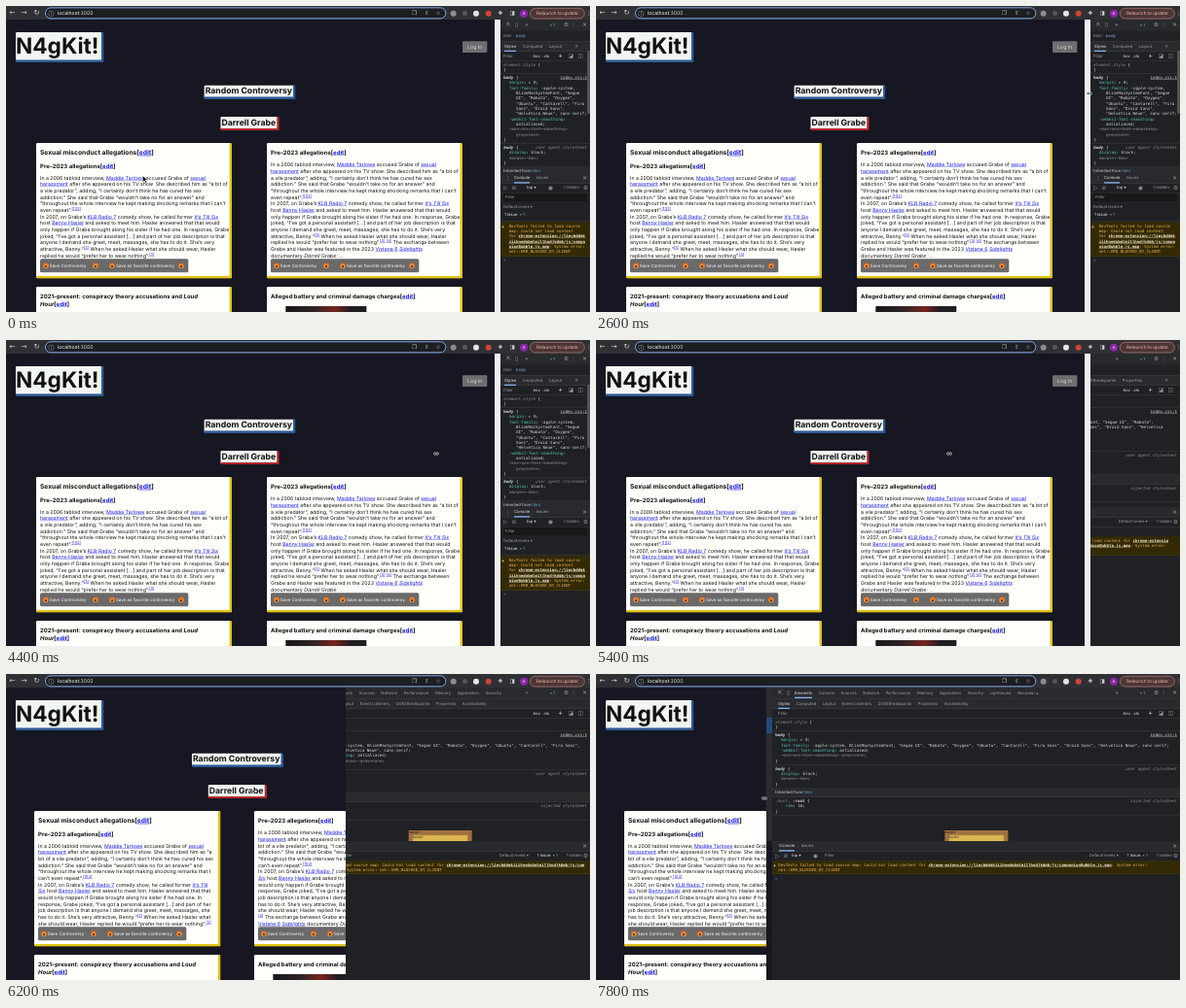
An HTML page for the animation above (8000 ms loop, 600 by 315 pixels).

```html
<!DOCTYPE html>
<html lang="en">
<head>
<meta charset="utf-8">
<title>Resizing developer tools</title>
<style>
html, body { margin: 0; width: 100%; height: 100%; overflow: hidden; background: #161722; }
#stage { position: absolute; width: 1800px; height: 945px; overflow: hidden; transform: scale(.333333); transform-origin: 0 0;
  font: 12.5px Inter, sans-serif; color: #9aa0a6; text-rendering: geometricPrecision; }
#stage > div, .b, .t { position: absolute; }
.t { line-height: 20px; white-space: nowrap; transform: translateY(-50%); }
.g { font-family: "DejaVu Sans", sans-serif; font-size: 17px; }
.on { color: #e8eaed; }

#page { left: 0; top: 42px; height: 903px; overflow: hidden; background: #161722; color: #111; }
#sheet { position: absolute; top: -42px; width: 1524px; height: 945px; }
.logo, .tag, .card { border: 0 solid; border-width: 0 8px 8px 0; border-radius: 4px; }
.logo { left: 30px; top: 81px; width: 264px; height: 85px; background: #f1f5f1; border-color: #2c5a94; font: 700 68px/85px Inter, sans-serif; }
.tag { left: 752px; height: 35px; padding: 0 3px; font: 700 26px/35px Inter, sans-serif; background: #f1f5f1; white-space: nowrap; transform: translateX(-50%); }
.login { left: 1407px; top: 109px; width: 76px; height: 35px; background: #6e6e70; border-radius: 3px; color: #ddd; font-size: 15.5px; line-height: 35px; text-align: center; }
.card { left: 93px; top: 423px; width: 595px; height: 411px; background: #fffffb; border-color: #e2c318; }
.second { left: 804px; }
.lower { top: 867px; }
.small .card { left: 87px; width: 567px; }
.small .second { left: 765px; }
.small .tag { left: 714px; }
.small .login { left: 1326px; }
.h { font: 700 18px/24px Inter, sans-serif; }
.big { font-size: 20px; }
.body { left: 12px; font-size: 15.65px; line-height: 20px; white-space: nowrap; }
a { color: #1818e4; text-decoration: underline; }
sup { font-size: 11.5px; line-height: 0; color: #1818e4; }
.narrowBreak, .small .wideBreak { display: none; }
.small .narrowBreak { display: inline; }
.bar { left: 12px; top: 358px; width: 457px; height: 42px; border-radius: 5px; background: #6a6a6a; color: #fff; font-size: 13.4px; }
.face { top: 12px; width: 18px; height: 18px; border-radius: 50%; background: radial-gradient(circle at 50% 65%, #5a2c16 14%, #ee9638 30%, #c9421f); }
.photo { left: 58px; top: 60px; width: 249px; height: 60px; background: linear-gradient(90deg, #17171b, #302326 35%, #78251d 60%, #211d22 80%); }
.scroll { left: 1506px; top: 0; width: 18px; height: 945px; background: #efefef; }

#dev { right: 0; top: 0; bottom: 0; background: #202124; }
.row { left: 0; right: 0; border-bottom: 1px solid #494c50; box-sizing: border-box; }
.head { background: #292a2d; }
.tree { left: -18px; top: 42px; width: 18px; height: 474px; background: linear-gradient(#2b2c30 93px, #244a7d 93px 141px, #2b2c30 141px); }
/* Tabs that do not fit wrap out of sight. */
.tabs { display: flex; flex-wrap: wrap; gap: 0 20px; height: 32px; line-height: 32px; overflow: hidden; white-space: nowrap; }
.tabs :first-child { color: #e8eaed; box-shadow: inset 0 -4px #8ab4f8; }
.main { left: 69px; right: 201px; top: 43px; }
.panes { left: 18px; right: 60px; top: 76px; }
.narrow .panes { left: 12px; }
.styles { left: 0; right: 0; top: 0; bottom: 0; }
.shift .styles { transform: translateY(33px); }
.code { font: 12.5px/16px "DejaVu Sans Mono", monospace; color: #d5d8dc; }
.rules { left: 0; right: 0; top: 136px; }
.rule { padding: 4px 9px 3px 10px; border-bottom: 1px solid #494c50; }
.rule div { padding-left: 38px; text-indent: -21px; }
.rule p { margin: 0; }
.rule em, .rule u { float: right; }
.rule em, .gray { color: #8b9096; }
.prop { color: #54c6bd; }
.rule s, .rule s .prop { color: #777c80; }
.inherit { height: 27px; padding-left: 10px; background: #292a2d; font: 12.5px/27px Inter, sans-serif; border-bottom: 1px solid #494c50; }
.model { left: 50%; width: 195px; height: 40px; margin-left: -97px; top: 483px; background: #a2703f; color: #222; font-size: 10px; line-height: 12px; }
.model i { position: absolute; inset: 14px 12px 0; background: #dfb753; border: 1px dashed #333; }
.thumb { right: 1px; top: 138px; width: 7px; height: 195px; border-radius: 4px; background: #5c5f63; }
.drawer { left: 0; right: 0; top: 516px; bottom: 0; background: #202124; }
.field { left: 9px; right: 9px; top: 62px; height: 25px; background: #17181a; }
.levels { display: flex; gap: 27px; right: 24px; top: 35px; line-height: 20px; white-space: nowrap; }
.issue { left: 12px; top: 66px; }
.narrow .issue { top: 122px; }
.log { left: 0; right: 0; top: 61px; }
.warn { padding: 4px 15px 4px 19px; background: #332a05; color: #eeb153; font-size: 12.2px; border-bottom: 1px solid #665500; }
.warn a { color: #f8ead0; font-weight: 700; word-break: break-all; }
.prompt { padding: 5px 9px; color: #5b9bf8; }
.shift .log { top: 91px; }
.narrow .log { top: 151px; }
.narrow .warn { padding-left: 26px; }
/* n: narrow, m: narrow or medium, w: medium or wide, x: wide only. */
.narrow .w, .shift .x, .wide .m, .wide .n, .shift:not(.narrow) .n { display: none; }
.badge { color: #8ab4f8; }

#chrome { left: 0; top: 0; width: 100%; height: 42px; background: #2f3034; color: #d5d6d9; }
#chrome .nav { font-size: 22px; }
.url { left: 120px; top: 4px; width: 1231px; height: 30px; border: 3px solid #7fa9ea; border-radius: 20px; background: #1d1e22; }
.address { font-size: 15.5px; }
.relaunch { left: 1614px; top: 6px; width: 166px; height: 30px; border-radius: 18px; border: 2px solid #bd8580; background: #4d3635; color: #f4b6b0; font-size: 14px; line-height: 30px; text-align: center; }
.dot { border-radius: 50%; }
#pointer svg { position: absolute; left: -14px; top: -14px; overflow: visible; }
</style>
</head>
<body>
<div id="stage">
  <div id="dev"></div>
  <div id="page"><div id="sheet"></div></div>
  <div id="chrome"></div>
  <div id="pointer">
    <svg width="28" height="28" stroke="#fff" stroke-width="1.5">
      <path id="arrow" d="M12 4v20l5-5 4 8 4-2-4-8h7z" fill="#111"/>
      <path id="resize" d="M5 14l6-5v3h6v-3l6 5-6 5v-3h-6v3z" fill="#222"/>
    </svg>
  </div>
</div>
<script>
const $ = id => document.getElementById(id);
// Layout helpers take stage pixels; the stage itself is laid out three times larger.
const px = n => (n * 3).toFixed(1) + 'px';
const text = (x, y, s, c = '') => `<span class="t ${c}" style="left:${px(x)};top:${px(y)}">${s}</span>`;
const textRight = (x, y, s, c = '') => `<span class="t ${c}" style="right:${px(x)};top:${px(y)}">${s}</span>`;
const box = (c, s = '', style = '') => `<div class="b ${c}" style="${style}">${s}</div>`;
const row = (y, h, c = '') => box('row ' + c, '', `top:${px(y)};height:${px(h)}`);
const tabs = (c, names) => box('tabs ' + c, names.map(s => `<span>${s}</span>`).join(''));
const dot = (x, y, d, color) => box('dot', '', `left:${px(x - d / 2)};top:${px(y - d / 2)};width:${px(d)};height:${px(d)};background:${color}`);
const edit = '[<a>edit</a>]';

// "^" breaks lines in the roomy layout only, "~" in the small one only.
const flow = s => s.replace(/\^/g, ' <br class="wideBreak">').replace(/~/g, ' <br class="narrowBreak">');
const story = `In a 2006 tabloid interview, <a>Maddie Tarlowe</a> accused Grabe of <a>sexual<br>harassment</a> after she appeared on his TV show. She described him as “a~bit of^a vile predator”, adding, “I certainly don’t think he has cured his sex<br>addiction.” She said that Grabe “wouldn’t take no for an answer” and<br>“throughout the whole interview he kept making shocking remarks that I~can’t^even repeat”.<sup><u>[1][2]</u></sup><br>In 2007, on Grabe’s <a>KLB Radio 7</a> comedy show, he called former <a><i>It’s Till~Six</i></a>^host <a>Benny Hasler</a> and asked to meet him. Hasler answered that that~would^only happen if Grabe brought along his sister if he had one. In~response, Grabe^joked, “I’ve got a personal assistant [...] and part of her~job description is that^anyone I demand she greet, meet, massages, she~has to do it. She’s very^attractive, Benny.”<sup><u>[3]</u></sup> When he asked Hasler what~she should wear, Hasler^replied he would “prefer her to wear nothing”.<sup><u>[3]</u></sup>`;
const sequel = `~<sup><u>[4]</u></sup> The exchange between^Grabe and Hasler was featured in the 2023~<a>Vistane 6</a> <a><i>Sidelights</i></a>^documentary <i>Darrell Grabe</i>: ...`;

const face = x => box('face', '', `left:${px(x - 3)}`);
const bar = box('bar', face(6) + text(9.8, 7.2, 'Save Controversy') + face(57) + face(74) + text(78, 7.2, 'Save as favorite controversy') + face(145));
const paragraph = (y, s) => box('body', flow(s), `top:${y}px`);

$('sheet').innerHTML =
  box('logo', 'N4gKit!') + box('login', 'Log In') +
  box('tag', 'Random Controversy', 'top:245px;border-color:#2c5a94') +
  box('tag', 'Darrell Grabe', 'top:342px;border-color:#b5262c') +
  box('card', text(4, 10, 'Sexual misconduct allegations' + edit, 'h big') + text(4, 24, 'Pre–2023 allegations' + edit, 'h') + paragraph(98, story) + bar) +
  box('card second', text(4, 10, 'Pre–2023 allegations' + edit, 'h') + paragraph(58, story + sequel) + bar) +
  box('card lower', text(4, 10, '2021–present: conspiracy theory accusations and <i>Loud</i>', 'h') + text(4, 18, `<i>Hour</i>${edit}`, 'h')) +
  box('card lower second', text(4, 10, 'Alleged battery and criminal damage charges' + edit, 'h') + box('photo')) +
  box('scroll');

$('chrome').innerHTML = box('url') +
  text(3.5, 7, '←', 'g nav') + text(15.5, 7, '→', 'g nav') + text(28.5, 7, '↻', 'g nav') +
  text(43.5, 7.3, 'ⓘ', 'g') + text(53, 7.5, '<span style="color:#fff">localhost</span>:3000', 'address') +
  text(417, 7, '❐', 'g') + text(430, 7, '⇧', 'g') + text(441.5, 7, '☆', 'g') +
  dot(459.5, 7.5, 6, '#8b8d91') + dot(471.5, 7.5, 5, '#55575b') + dot(483, 7.5, 6, '#e6e6e6') + dot(495.5, 7.5, 6, '#d04438') +
  text(505.5, 7, '✚', 'g') + text(517.5, 7, '◨', 'g') + dot(532, 7.5, 8, '#8e24aa') + text(530.5, 7.5, 'A', 'on') +
  box('relaunch', 'Relaunch to update') + text(596, 7, '⋮', 'g');

const decl = (name, value) => `<div><span class="prop">${name}</span>: ${value};</div>`;
const dead = (name, value) => `<div><s><span class="prop">${name}</span>: ${value};</s></div>`;
const rule = (selector, inner = '', origin = '') => `<div class="rule">${origin}<p>${selector} {</p>${inner}<p>}</p></div>`;
const fonts = '-apple-system, BlinkMacSystemFont, "Segoe UI", "Roboto", "Oxygen", "Ubuntu", "Cantarell", "Fira Sans", "Droid Sans", "Helvetica Neue", sans-serif';
const issue = '1 Issue: <span class="badge">▪ 1</span>';

const rules =
  rule('<span class="gray">element.style</span>') +
  rule('<b>body</b>', decl('margin', '▸ 0') + decl('font-family', fonts) + decl('-webkit-font-smoothing', 'antialiased') + dead('-moz-osx-font-smoothing', 'grayscale'), '<u>index.css:1</u>') +
  rule('<b><i>body</i></b>', decl('display', 'block') + dead('margin', '8px'), '<em>user agent stylesheet</em>') +
  '<div class="inherit">Inherited from <span style="color:#5db0d7">html</span></div>' +
  rule('<span class="gray">:host</span>, <b>:root</b>', decl('--rem', '16'), '<em>injected stylesheet</em>');

const styles = box('rules code', rules) + box('model w', 'margin<i>border</i>') +
  row(25, 11, 'head') + tabs('panes', ['Styles', 'Computed', 'Layout', 'Event Listeners', 'DOM Breakpoints', 'Properties', 'Accessibility']) +
  textRight(12, 30.5, '»', 'm g') + row(36, 9.3) + text(6, 40.5, 'Filter', 'w') + text(3, 40.5, 'Filter', 'n') +
  textRight(42, 40.5, ':hov &nbsp;.cls', 'on') + textRight(28, 40.5, '+', 'g on') + textRight(17, 40.5, '◪', 'g') + textRight(7, 40.5, '◫', 'g');

const drawer = row(0, 10.8, 'head') + text(5, 5.5, '⋮', 'n g') + textRight(3, 5.5, '✕', 'g') +
  box('tabs n', '<span>Console</span><span>Issues</span>', 'left:42px;top:0') +
  box('tabs w', '<span>Console</span><span>Issues</span>', 'left:21px;top:0') +
  row(10.8, 9.4) + text(3, 15, '▷', 'g') + text(11.5, 15, '⊘', 'g') +
  text(20, 15, 'top ▾', 'w on') + text(42, 15, '◉', 'w g') + text(54, 15, 'Filter', 'w') +
  text(27, 15, 'top ▾', 'n on') + text(49, 15, '◉', 'n g') + textRight(11, 15, '1 hidden', 'n') + textRight(2, 15, '⚙', 'g') +
  box('levels w', `<span>Default levels ▾</span><span class="x on">${issue}</span><span>1 hidden</span>`) +
  box('field n') + text(5, 24.8, 'Filter', 'n') + text(3, 34.5, 'Default levels ▾', 'n') + row(38.5, 11, 'n') +
  box('issue m on', issue) +
  box('log code', `<div class="warn">${text(1.2, 4.2, '▲')}DevTools failed to load source map: Could not load content for&nbsp;<a>chrome-extension://liecbddmkiiihnedobmlmillhodjkdmb/js/companionBubble.js.map</a>: System error: net::ERR_BLOCKED_BY_CLIENT</div><div class="prompt">&gt;</div>`);

$('dev').innerHTML = box('tree') + box('styles', styles) +
  row(14, 11.3, 'head') + text(6, 19.5, '⇱', 'g') + text(15, 19.5, '▯', 'g') +
  tabs('main w', ['Elements', 'Console', 'Sources', 'Network', 'Performance', 'Memory', 'Application', 'Security', 'Lighthouse', 'Recorder ▴']) +
  text(25, 19.5, '»', 'n g') + textRight(63, 19.5, '»', 'w g') + textRight(36, 19.5, '▪ 1', 'badge') +
  textRight(22, 19.5, '⚙', 'g') + textRight(14, 19.5, '⋮', 'g') + textRight(3, 19.5, '✕', 'g') +
  box('m row', text(3, 5.5, 'html') + text(16, 5.5, 'body', 'badge'), 'top:76px;height:33px;background:#202124') +
  box('thumb n') + box('drawer', drawer);

const pointerPath = [[0, 141, 178], [2600, 507, 90], [3600, 506, 116], [4400, 442, 117], [5400, 363, 117], [6200, 253, 121], [7000, 180, 127], [7800, 173, 128]];
const toolsEdge = [[4600, 508], [5400, 391], [6200, 292], [7000, 239], [7800, 181]];
const pageEdge = [[5400, 508], [5600, 450], [6200, 349], [7000, 239], [7800, 175]];

function along(points, time) {
  const next = points.findIndex(p => p[0] >= time);
  if (next === 0) return points[0].slice(1);
  const a = points[next - 1], b = points[next];
  const k = (time - a[0]) / (b[0] - a[0]);
  return a.slice(1).map((v, i) => v + (b[i + 1] - v) * k);
}

function draw(now) {
  const time = Math.floor(now % 8000 / 200) * 200;
  const [left] = along(toolsEdge, time), [right] = along(pageEdge, time), [x, y] = along(pointerPath, time);
  $('dev').style.left = px(left);
  $('dev').className = left > 450 ? 'shift narrow' : left > 340 ? 'shift' : 'wide';
  $('page').style.width = px(right);
  $('page').className = right < 500 ? 'small' : '';
  $('pointer').style.left = px(x);
  $('pointer').style.top = px(y);
  $('arrow').style.display = time < 2600 ? '' : 'none';
  $('resize').style.display = time < 2600 ? 'none' : '';
  requestAnimationFrame(draw);
}
draw(0);
</script>
</body>
</html>
```
